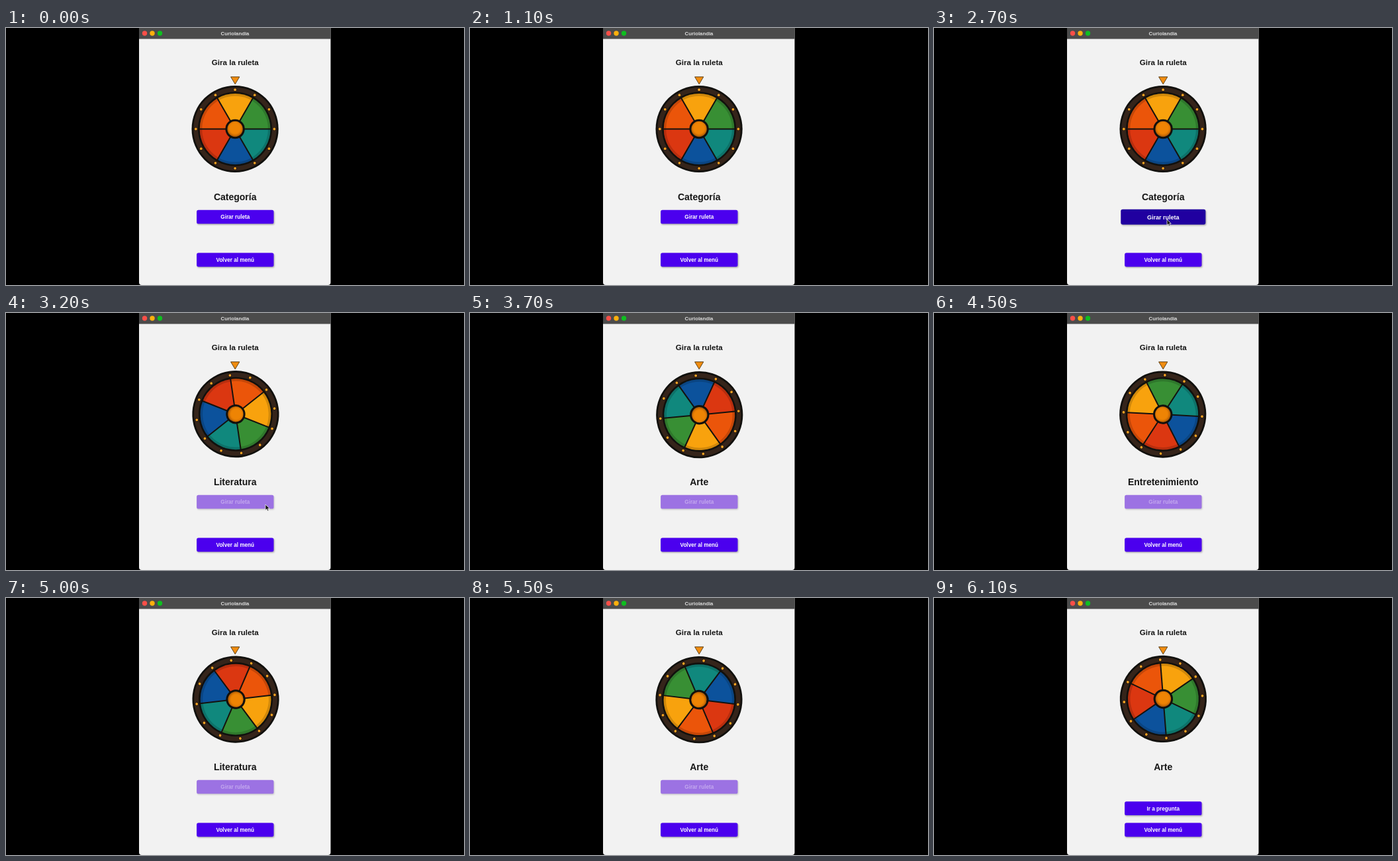
An HTML page that plays this animation: 692 px wide and 388 px high, repeating every 7.1 s.

```html
<!DOCTYPE html>
<html lang="es">
<head>
<meta charset="utf-8">
<title>Curiolandia</title>
<style>
html, body { margin: 0; width: 100%; height: 100%; overflow: hidden; background: #000; }
svg { display: block; width: 692px; height: 388px; }
text { font-family: "Liberation Sans", Arial, sans-serif; font-weight: bold; text-anchor: middle; fill: #161616; }
.btn text { font-size: 8.18px; fill: #fff; }
.btn rect { fill: #4b00ee; }
.btn .shade { fill: #000; opacity: .3; filter: url(#soft); }
.btn.hover .face { fill: #2000a0; }
.btn.off .face { fill: #9c72e3; }
.btn.off text { fill: #c3a8ee; }
.btn.off .shade { opacity: .16; }
</style>
</head>
<body>
<svg viewBox="0 0 692 388">
  <defs>
    <filter id="soft" x="-10%" y="-40%" width="120%" height="180%"><feGaussianBlur stdDeviation="1.1"/></filter>
    <radialGradient id="hub" cx=".5" cy=".45">
      <stop offset=".65" stop-color="#ee8404"/>
      <stop offset=".82" stop-color="#e07a04"/>
      <stop offset="1" stop-color="#b86004"/>
    </radialGradient>
  </defs>
  <path d="M201 0H490.5V384a4 4 0 0 1-4 4H205a4 4 0 0 1-4-4Z" fill="#f2f2f2"/>
  <rect x="201" width="289.5" height="16.5" fill="#4b4b4b"/>
  <circle cx="209.5" cy="8" r="3.7" fill="#fb4f48"/>
  <circle cx="221" cy="8" r="3.7" fill="#fdb00c"/>
  <circle cx="232.5" cy="8" r="3.7" fill="#0fbf20"/>
  <text x="346" y="10.6" font-size="7.8" style="fill:#dcdcdc">Curiolandia</text>
  <text x="346.3" y="56.1" font-size="11.6">Gira la ruleta</text>
  <g id="wheel"></g>
  <path d="M339.6 73.8H352.8L346.2 84.8Z" fill="#f18d10" stroke="#4d3512" stroke-width=".9"/>
  <text id="label" x="346.2" y="260.3" font-size="14"></text>
  <g id="buttons"></g>
  <path id="cursor" d="M0 0V8.6L2 6.9 3.5 10 5 9.3 3.6 6.3H6.3Z" fill="#111" stroke="#eee" stroke-width=".8"/>
</svg>
<script>
const $ = id => document.getElementById(id);
const NS = "http://www.w3.org/2000/svg";
const LOOP = 7100, STEP = 100;
const SPIN = { start: 2896, time: 3000, turn: 7 * 360 + 25.5 };
const WORDS = ["Literatura", "Entretenimiento", "Arte"];
const COLORS = ["#f8a20d", "#388f34", "#10887d", "#0c529c", "#db3711", "#eb550a"];

function add(parent, tag, attrs) {
  const el = document.createElementNS(NS, tag);
  for (const k in attrs) el.setAttribute(k, attrs[k]);
  return parent.appendChild(el);
}

function polar(deg, r) {
  const a = deg * Math.PI / 180;
  return [r * Math.sin(a), -r * Math.cos(a)].map(v => v.toFixed(2)).join(" ");
}

function buildWheel() {
  const g = add($("wheel"), "g", {});
  const disc = (r, fill, more) => add(g, "circle", { r, fill, ...more });
  disc(65.6, "#11100d");
  disc(62.8, "#35241a");
  disc(56, "#11100d");
  COLORS.forEach((fill, i) => add(g, "path", {
    d: `M0 0L${polar(i * 60 - 30, 53.4)}A53.4 53.4 0 0 1 ${polar(i * 60 + 30, 53.4)}Z`, fill
  }));
  disc(51.6, "none", { stroke: "#000", "stroke-opacity": .16, "stroke-width": 3.6 });
  for (let i = 0; i < 6; i++)
    add(g, "path", { d: `M0 0L${polar(i * 60 + 30, 54)}`, stroke: "#14120e", "stroke-width": 2 });
  for (let i = 0; i < 12; i++) {
    const [cx, cy] = polar(i * 30, 59.3).split(" ");
    disc(2.5, "#1d140d", { cx, cy });
    disc(1.9, "#f4a224", { cx, cy });
  }
  disc(14.7, "#11100d");
  disc(11.7, "url(#hub)");
  g.setAttribute("transform", "translate(-.3 -.6)");
}

function button(name, y) {
  const g = add($("buttons"), "g", {});
  const box = { x: -58.2, y: -10.4, width: 116.4, height: 20.8, rx: 2.6 };
  add(g, "rect", { ...box, class: "shade", transform: "translate(1 1.4)" });
  add(g, "rect", { ...box, class: "face" });
  add(g, "text", { y: 3 }).textContent = name;
  return (state = "", scale = 1) => {
    g.setAttribute("class", "btn " + state);
    g.setAttribute("transform", `translate(346.3 ${y}) scale(${scale})`);
    g.style.display = state === "gone" ? "none" : "";
  };
}

// gentle start and stop over the first and last fifth
function ease(u) {
  if (u <= 0) return 0;
  if (u >= 1) return 1;
  if (u < .2) return 3.125 * u * u;
  if (u > .8) return 1 - 3.125 * (1 - u) * (1 - u);
  return 1.25 * u - .125;
}

function cursorAt(t) {
  if (t < 1400 || t >= 3600) return null;
  if (t < 2900) {
    const left = 1 - Math.min(1, (t - 1400) / 800);
    return [352 + 132 * left * left, 289 + 2 * left];
  }
  return [352 + 113 * ((t - 2900) / 600) ** 1.5, 289];
}

buildWheel();
const spin = button("Girar ruleta", 285.2);
const ask = button("Ir a pregunta", 317.7);
const back = button("Volver al menú", 350);
back();

function draw(t) {
  const angle = SPIN.turn * ease((t - SPIN.start) / SPIN.time);
  $("wheel").setAttribute("transform", `translate(346.4 153.1) rotate(${angle % 360})`);

  const spinning = t >= 2900 && t < 5900, done = t >= 5900;
  $("label").textContent = done ? "Arte"
    : spinning ? WORDS[Math.floor((t - 2900) / 100) % 3] : "Categoría";

  const pos = cursorAt(t);
  $("cursor").style.display = pos ? "" : "none";
  if (pos) $("cursor").setAttribute("transform", `translate(${pos})`);

  if (done) spin("gone");
  else if (spinning) spin("off");
  else if (pos && pos[0] < 404) spin("hover", 1.1);
  else spin();
  ask(done ? "" : "gone");
}

const begin = performance.now();
function tick() {
  const t = (performance.now() - begin) % LOOP;
  draw(Math.floor(t / STEP) * STEP);
  requestAnimationFrame(tick);
}
tick();
</script>
</body>
</html>
```
